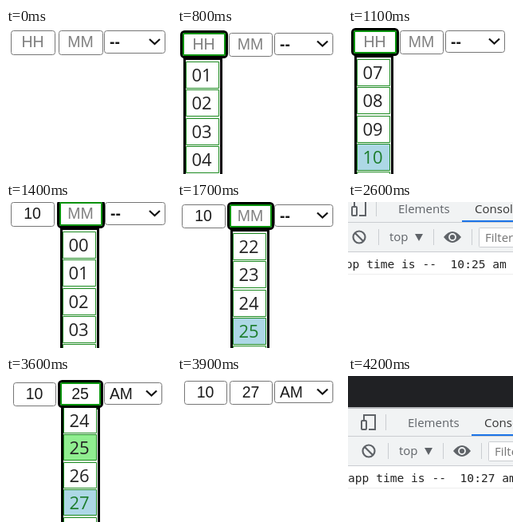
These frames come from a looping animation (207 by 183 pixels, 5200 ms). An HTML page with a canvas:

```html
<!DOCTYPE html>
<html lang="en">
<head>
<meta charset="utf-8">
<title>Time picker</title>
<style>
html, body { margin: 0; width: 100%; height: 100%; overflow: hidden; background: #fff; }
canvas { display: block; }
</style>
</head>
<body>
<canvas id="stage" width="207" height="183"></canvas>
<script>
const ctx = document.getElementById('stage').getContext('2d');
const SANS = '"Liberation Sans", Arial, sans-serif';
const UI = '"Open Sans", sans-serif';
const MONO = '"DejaVu Sans Mono", monospace';
const GREEN = '#08930c';

function fill(color, x, y, w, h) {
  ctx.fillStyle = color;
  ctx.fillRect(x, y, w, h);
}

function box(x, y, w, h, r, color, line, inside = '#fff') {
  ctx.beginPath();
  ctx.roundRect(x + line / 2, y + line / 2, w - line, h - line, r);
  ctx.fillStyle = inside;
  ctx.fill();
  ctx.lineWidth = line;
  ctx.strokeStyle = color;
  ctx.stroke();
}

function text(str, x, y, font, color = '#1a1a1a', align = 'left') {
  ctx.font = font;
  ctx.textAlign = align;
  ctx.fillStyle = color;
  ctx.fillText(str, x, y);
}

function path(d, color, line) {
  ctx.strokeStyle = color;
  ctx.lineWidth = line;
  ctx.stroke(new Path2D(d));
}

const pad = n => String(n).padStart(2, '0');

function field(value, x1, x2, y, h, focused) {
  if (focused) {
    box(x1 - 2, y - 3, x2 - x1 + 4, h + 5, 4, '#000', 3);
    box(x1 + 1, y, x2 - x1 - 2, h - 1, 1, GREEN, 2);
  } else {
    box(x1, y, x2 - x1, h, 3, '#767676', 1);
  }
  const color = /\d/.test(value) ? '#1a1a1a' : '#808080';
  text(value, (x1 + x2) / 2 - 0.5, y + Math.floor(h / 2) + 6, '19.5px ' + SANS, color, 'center');
}

function dropdown(value, x1, x2, y, h) {
  box(x1, y, x2 - x1, h, 3, '#767676', 1);
  text(value, x1 + 7, y + h / 2 + 6.5, (value === '--' ? 'bold ' : '') + '19.3px ' + SANS);
  const cy = y + h / 2 - 0.5;
  path(`M${x2 - 20} ${cy - 3}l6.5 6l6.5 -6`, '#111', 2.2);
}

// scroll: how far the first row is pushed up
function list(x, y, { from, hover, chosen, pitch = 35.3, scroll = 0 }) {
  fill('#000', x, y, 49, 183);
  fill('#fff', x + 3, y + 3, 43, 183);
  for (let i = 0; i < 5; i++) {
    const n = from + i, top = Math.round(y + 5 - scroll + i * pitch);
    const inside = n === hover ? '#add8e6' : n === chosen ? '#90ee90' : '#fff';
    box(x + 3, top, 42, Math.round(pitch) - 1, 0, '#1b8a1f', 1, inside);
    if (i < 4) {
      text(pad(n), x + 23, top + 25, '22px ' + UI, n === hover ? '#1c7d2c' : '#222', 'center');
    }
  }
}

// edges: left and right of the hour field, minute field and period select
function picker([hour, minute, period], edges, y, h, focus, options) {
  const [a, b, c, d, e, f] = edges;
  if (options) list(focus ? c + 2 : a + 2, y + h + 1, options);
  field(hour, a, b, y, h, focus === 0);
  field(minute, c, d, y, h, focus === 1);
  dropdown(period, e, f, y, h - 2);
}

function periodMenu() {
  ctx.save();
  ctx.shadowColor = '#0007';
  ctx.shadowBlur = 6;
  ctx.shadowOffsetX = ctx.shadowOffsetY = 2;
  fill('#fff', 117, 34, 72, 73);
  ctx.restore();
  box(117, 34, 72, 73, 0, '#aaa', 1);
  fill('#1e90ff', 118, 35, 70, 24);
  text('--', 123, 53, '20px ' + SANS, '#fff');
  text('AM', 123, 76, '19.5px ' + SANS);
  text('PM', 123, 100, '19.5px ' + SANS);
}

function devtools(dx, dy, time) {
  const grey = '#5f6368', rule = '#cacdd1', ui = '15px ' + UI;
  fill('#202124', 0, 0, 207, dy - 11);
  fill('#b8babd', 0, dy - 11, 207, 2);
  ctx.save();
  ctx.translate(dx, dy);
  fill('#f1f3f4', -dx, -9, 207, 71);
  fill(rule, -dx, 25, 207, 1);
  fill(rule, -dx, 62, 207, 1);
  path('M8 7V-1H22V17H14', grey, 2);
  box(4, 5, 8, 13, 1, grey, 2, '#f1f3f4');
  fill(rule, 35, -2, 1, 20);
  text('Elements', 63, 14, ui, grey);
  text('Console', 159, 14, ui, '#333');
  fill('#1a73e8', 143, 23, 80, 2);

  ctx.beginPath();
  ctx.arc(14, 44, 7.5, 0, 7);
  ctx.lineWidth = 2.2;
  ctx.strokeStyle = grey;
  ctx.stroke();
  path('M9 39L19 49', grey, 2.2);
  for (const x of [38, 107, 155]) fill(rule, x, 34, 1, 20);
  text('top', 52, 49, ui, grey);
  ctx.fill(new Path2D('M84 40h10l-5 9z'));
  ctx.fill(new Path2D('M120 44Q131 30 142 44Q131 58 120 44z'));
  ctx.beginPath();
  ctx.arc(131, 44, 4, 0, 7);
  ctx.lineWidth = 1.8;
  ctx.strokeStyle = '#f1f3f4';
  ctx.stroke();
  box(164, 32, 70, 25, 1, rule, 1);
  text('Filter', 172, 50, ui, '#757575');

  text(`app time is --  ${time} am`, -12, 83, '14.6px ' + MONO, '#222');
  fill('#eee', -dx, 90, 207, 1);
  ctx.restore();
}

const scenes = [
  [0, () => picker(['HH', 'MM', '--'], [6, 62, 66, 122, 123, 200], 3, 31)],
  [800, () => picker(['HH', 'MM', '--'], [6, 62, 65, 120, 122, 196], 6, 30, 0, { from: 1 })],
  [1100, () => picker(['HH', 'MM', '--'], [6, 62, 65, 120, 122, 197], 3, 30, 0, { from: 7, hover: 10 })],
  [1400, () => picker(['10', 'MM', '--'], [6, 61, 66, 122, 124, 200], 0, 31, 1, { from: 0 })],
  [1700, () => picker(['10', 'MM', '--'], [6, 61, 65, 120, 122, 196], 3, 30, 1, { from: 22, hover: 25 })],
  [2000, () => { picker(['10', '25', '--'], [6, 59, 62, 115, 117, 190], 5, 30); periodMenu(); }],
  [2300, () => picker(['10', '25', 'AM'], [6, 62, 66, 122, 124, 201], 4, 31)],
  [2600, () => devtools(0, 0, '10:25')],
  [3600, () => picker(['10', '25', 'AM'], [9, 63, 67, 120, 123, 196], 8, 30, 1, { from: 24, hover: 27, chosen: 25, pitch: 34.4, scroll: 5 })],
  [3900, () => picker(['10', '27', 'AM'], [9, 63, 66, 120, 122, 196], 6, 30)],
  [4200, () => devtools(12, 50, '10:27')],
];

const start = performance.now();
function frame() {
  const t = (performance.now() - start) % 5200;
  fill('#fff', 0, 0, 207, 183);
  scenes.findLast(([at]) => t >= at)[1]();
  requestAnimationFrame(frame);
}
frame();
</script>
</body>
</html>
```
